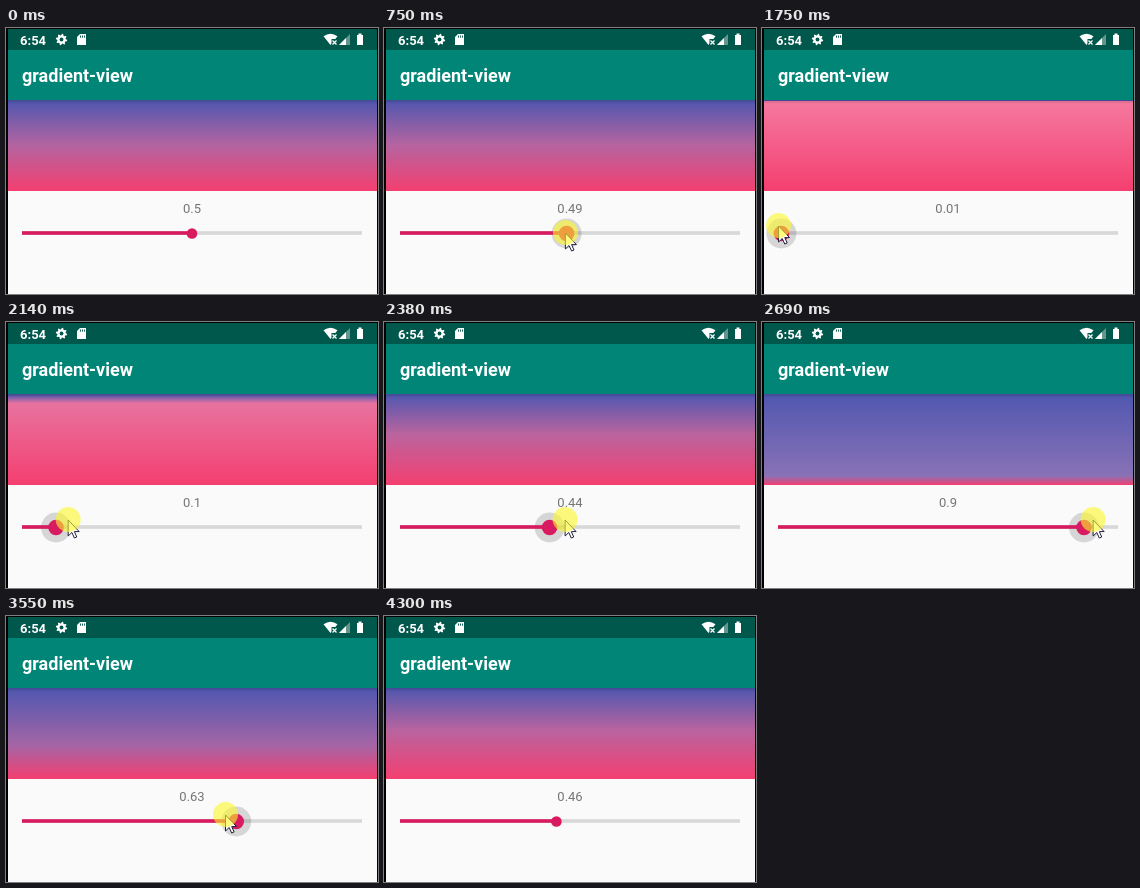
Recreate the animation shown at these times as an HTML page with a canvas. Size 372 by 266 pixels, loop 5010 ms.

```html
<!DOCTYPE html>
<html lang="en">
<head>
<meta charset="utf-8">
<title>gradient-view</title>
<style>
  html, body { margin: 0; width: 100%; height: 100%; overflow: hidden; background: #fafafa; }
  canvas { display: block; }
</style>
</head>
<body>
<canvas id="stage" width="372" height="266"></canvas>
<script>
const ctx = document.getElementById('stage').getContext('2d');
const LOOP = 5010;
const STEP = 77;
const LEAD = .4;      // steps by which the pointer runs ahead of the thumb
const ACCENT = '#d81b60';
const STATUS = '#00574b';
const TRACK = { left: 16, width: 340, y: 205 };

// Smooth 0 to 1 between two steps.
function ramp(from, to, step) {
  const u = Math.min(1, Math.max(0, (step - from) / (to - from)));
  return u * u * (3 - 2 * u);
}

// Three drags: down to 0, up to 1, back to 0.46.
const valueAt = step => .5 - .5 * ramp(9, 24.1, step)
  + ramp(25.7, 37.3, step) - .54 * ramp(39, 50.1, step);

const trackX = value => TRACK.left + TRACK.width * value;

function pointerAt(step) {
  const enter = 1 - ramp(1.5, 7, step);
  const leave = Math.max(0, (step - 51) / 4) ** 2.5;
  const drift = 5 * ramp(44, 51, step) - 7 * ramp(16, 23, step);
  return {
    x: trackX(valueAt(step + LEAD)) + 5 * enter + 76 * leave,
    y: 204 + drift + 56 * enter + 52 * leave,
  };
}

function rect(color, x, y, w, h) {
  ctx.fillStyle = color;
  ctx.fillRect(x, y, w, h);
}

function disc(color, x, y, r) {
  ctx.fillStyle = color;
  ctx.beginPath();
  ctx.arc(x, y, r, 0, Math.PI * 2);
  ctx.fill();
}

function shape(color, points) {
  ctx.fillStyle = color;
  ctx.beginPath();
  points.forEach(([x, y]) => ctx.lineTo(x, y));
  ctx.closePath();
  ctx.fill();
}

function text(str, x, y, font, color, align = 'left') {
  ctx.font = font + ' Roboto, sans-serif';
  ctx.fillStyle = color;
  ctx.textAlign = align;
  ctx.fillText(str, x, y);
}

function gear(x, y) {
  const points = [];
  for (let i = 0; i < 32; i++) {
    const a = (i + .5) * Math.PI / 16;
    const r = i % 4 < 2 ? 5.7 : 4.2;
    points.push([x + r * Math.cos(a), y + r * Math.sin(a)]);
  }
  shape('#fff', points);
  disc(STATUS, x, y, 1.9);
}

function wifi(x, y) {
  ctx.fillStyle = '#fff';
  ctx.beginPath();
  ctx.moveTo(x, y);
  ctx.lineTo(x - 7, y - 8.7);
  ctx.quadraticCurveTo(x, y - 14, x + 7, y - 8.7);
  ctx.fill();
  rect(STATUS, x + 1, y - 6, 6, 7);
  ctx.strokeStyle = '#fff';
  ctx.lineWidth = 1.3;
  ctx.beginPath();
  ctx.moveTo(x + 2, y - 4.5);
  ctx.lineTo(x + 6, y - .5);
  ctx.moveTo(x + 6, y - 4.5);
  ctx.lineTo(x + 2, y - .5);
  ctx.stroke();
}

function statusBar() {
  rect(STATUS, 2, 1, 369, 21);
  text('6:54', 14, 16.5, '600 13px', '#fff');
  gear(55.5, 11.5);
  shape('#fff', [[74, 6], [80, 6], [80, 17], [71, 17], [71, 9]]);
  for (let x = 74; x < 79; x += 2) rect(STATUS, x, 7.5, .9, 2.2);
  wifi(324.5, 17);
  shape('#66958d', [[344, 6], [344, 17], [333, 17]]);
  shape('#fff', [[340, 10], [340, 17], [333, 17]]);
  rect('#fff', 351, 7, 6, 10);
  rect('#fff', 352.5, 5.5, 3, 2);
}

// The middle colour runs from pink to lavender as its stop moves down.
function centerColor(v) {
  const r = 246 - 148 * v + 30 * v * v;
  const g = 100 + 88 * (v - .5) ** 2;
  const b = 160 + 60 * v * (v - .5);
  return `rgb(${[r, g, b].map(Math.round)})`;
}

function gradientView(value) {
  const fill = ctx.createLinearGradient(0, 72.5, 0, 163);
  fill.addColorStop(0, '#5057b0');
  fill.addColorStop(value, centerColor(value));
  fill.addColorStop(1, '#f43f70');
  rect(fill, 2, 72, 369, 91);
  const shadow = ctx.createLinearGradient(0, 72, 0, 76);
  shadow.addColorStop(0, 'rgba(0,0,0,.16)');
  shadow.addColorStop(1, 'rgba(0,0,0,0)');
  rect(shadow, 2, 72, 369, 4);
}

function slider(value, press) {
  const x = trackX(value);
  const top = TRACK.y - 1.8;
  rect('#d8d8d8', TRACK.left, top, TRACK.width, 3.6);
  disc('rgba(0,0,0,.14)', x, TRACK.y + .5, 15 * press);
  rect(ACCENT, TRACK.left, top, x - TRACK.left, 3.6);
  disc(ACCENT, x, TRACK.y + .5, 5.3 + 2.5 * press);
}

function pointer({ x, y }, pressed) {
  ctx.save();
  ctx.translate(x - .5, y + 1);
  shape('#fff', [[0, 0], [0, 16], [3.7, 12.5], [6.2, 18], [8.6, 17], [6.2, 11.6], [11, 11.6]]);
  ctx.strokeStyle = '#20203a';
  ctx.lineWidth = 1;
  ctx.stroke();
  ctx.restore();
  if (pressed) disc('rgba(252,246,40,.6)', x - .5, y + .5, 12.5);
}

function draw(ms) {
  const step = Math.floor((ms % LOOP + 25) / STEP);
  const value = Math.round(valueAt(step) * 100) / 100;
  rect('#000', 0, 0, 372, 266);
  rect('#fafafa', 2, 2, 369, 264);
  statusBar();
  rect('#008577', 2, 22, 369, 50);
  text('gradient-view', 16, 54, '600 18px', '#fff');
  gradientView(value);
  text(String(value), 186, 185, '13px', '#757575', 'center');
  slider(value, ramp(8, 10, step) - ramp(50, 52, step));
  if (step >= 2 && step < 56) pointer(pointerAt(step), step >= 9 && step <= 51);
}

const start = performance.now();
function tick() {
  draw(performance.now() - start);
  requestAnimationFrame(tick);
}
tick();
</script>
</body>
</html>
```
